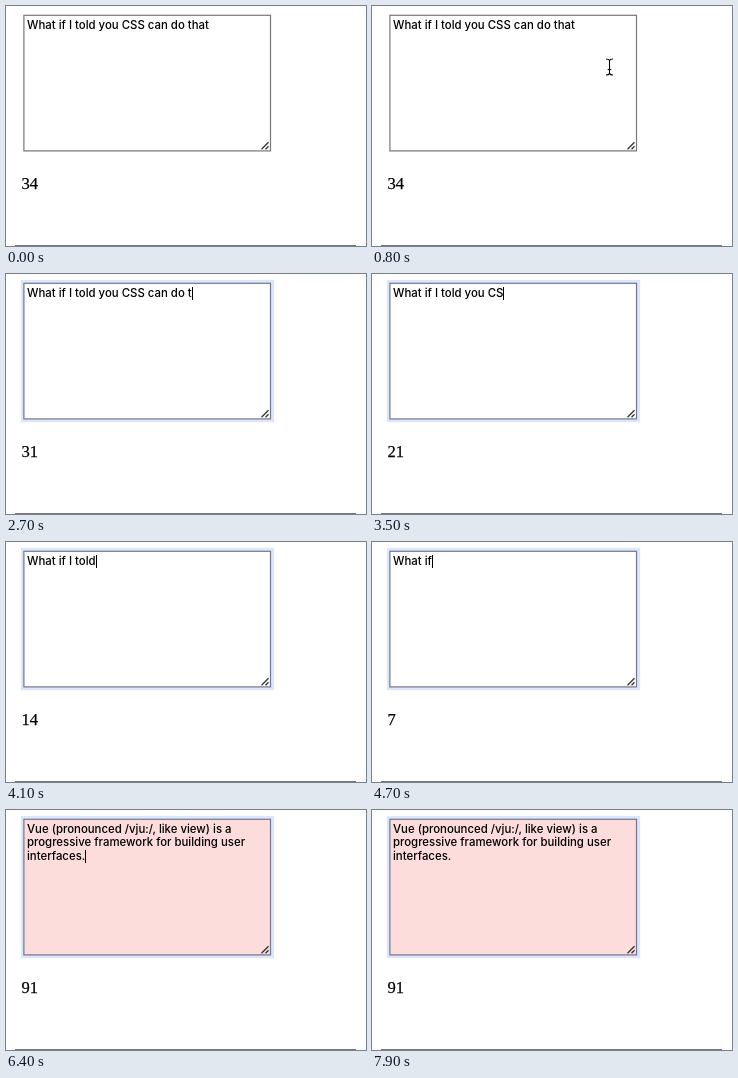
An HTML page that plays this animation: 360x240 px, repeating every 8 s.

```html
<!DOCTYPE html>
<html lang="en">
<head>
<meta charset="utf-8">
<title>Character counter</title>
<style>
  html, body { margin: 0; width: 100%; height: 100%; overflow: hidden; background: #fff; }
  #stage { position: relative; width: 360px; height: 240px; overflow: hidden; }
  #stage > * { position: absolute; }
  #box {
    left: 18px; top: 9px; width: 247px; height: 136px; box-sizing: border-box;
    padding: 4px 3px; color: #000;
    font: 500 11.4px/13.4px Inter, "Open Sans", sans-serif; white-space: pre;
  }
  #box.focus { box-shadow: 0 0 1px 3px #dbe6fb; }
  #box.over { background: #fddddb; }
  #caret {
    display: inline-block; width: 1px; height: 13px; margin-right: -1px;
    vertical-align: -3px; background: #000;
  }
  #count {
    left: 15.5px; top: 168px; color: #000; -webkit-text-stroke: .25px #000;
    font: 16.6px/20px "Liberation Serif", Times, serif;
  }
  #rule { left: 9px; top: 239px; width: 341px; height: 1px; background: #777; }
  svg { left: 0; top: 0; overflow: visible; }
  #edge { stroke: #777; stroke-width: 1.2; }
  .focus ~ svg #edge { stroke: #737690; }
</style>
</head>
<body>
<div id="stage">
  <div id="box"><span id="text"></span><i id="caret"></i></div>
  <div id="count"></div>
  <div id="rule"></div>
  <svg width="360" height="240" fill="none">
    <rect id="edge" x="17.9" y="9.3" width="246.6" height="135.6"/>
    <path d="M255.5 143.3 L262.5 136.3 M259.5 143.3 L262.5 140.3" stroke="#333" stroke-width="1.3"/>
    <path id="arrow" d="M0 0 V14.5 L3.4 11.4 L5.7 16.6 L8 15.6 L5.8 10.5 H10.4 Z" fill="#000" stroke="#fff"/>
    <path id="beam" d="M-3.5 -8 Q-.5 -8 0 -6.5 Q.5 -8 3.5 -8 M0 -6.5 V6.5 M-3.5 8 Q-.5 8 0 6.5 Q.5 8 3.5 8 M-1.8 2.5 H1.8" stroke="#000" stroke-width="1.1"/>
  </svg>
</div>
<script>
  const LOOP = 8000, TICK = 100;
  const FIRST = "What if I told you CSS can do that";
  const SECOND = "Vue (pronounced /vju:/, like view) is a\nprogressive framework for building user\ninterfaces.";
  const CARET_ON = [[1000, 1500], [2000, 5700], [6400, 6900], [7400, 7900]];
  // pointer stops: time, x, y
  const PATH = [[100, 277, 233], [300, 270, 176], [500, 257, 115], [700, 242, 70],
                [900, 233, 52], [1100, 233, 52], [1300, 256, 52], [2000, 256, 52]];
  const $ = id => document.getElementById(id);

  function textAt(t) {
    if (t >= 6400) return SECOND;
    if (t < 2100) return FIRST;
    // one key press, a pause, then key repeat
    const repeats = t < 2600 ? 0 : 1 + Math.floor((t - 2600) / 82 + 0.35);
    return FIRST.slice(0, Math.max(0, FIRST.length - 1 - repeats));
  }

  function pointerAt(t) {
    const i = PATH.findIndex(p => p[0] > t);
    if (i < 1) return null;
    const [a, b] = [PATH[i - 1], PATH[i]];
    const k = (t - a[0]) / (b[0] - a[0]);
    return [a[1] + (b[1] - a[1]) * k, a[2] + (b[2] - a[2]) * k];
  }

  function show(el, on) { el.style.visibility = on ? "visible" : "hidden"; }

  function draw() {
    const t = Math.floor(performance.now() % LOOP / TICK) * TICK;
    const text = textAt(t), pos = pointerAt(t);
    $("text").textContent = text;
    $("count").textContent = text.length;
    $("box").classList.toggle("focus", t >= 1000);
    $("box").classList.toggle("over", text === SECOND);
    show($("caret"), CARET_ON.some(([a, b]) => t >= a && t < b));
    const inside = pos && pos[0] < 265 && pos[1] < 146;
    show($("arrow"), pos && !inside);
    show($("beam"), inside);
    if (pos) (inside ? $("beam") : $("arrow")).setAttribute("transform", `translate(${pos})`);
    requestAnimationFrame(draw);
  }
  draw();
</script>
</body>
</html>
```
